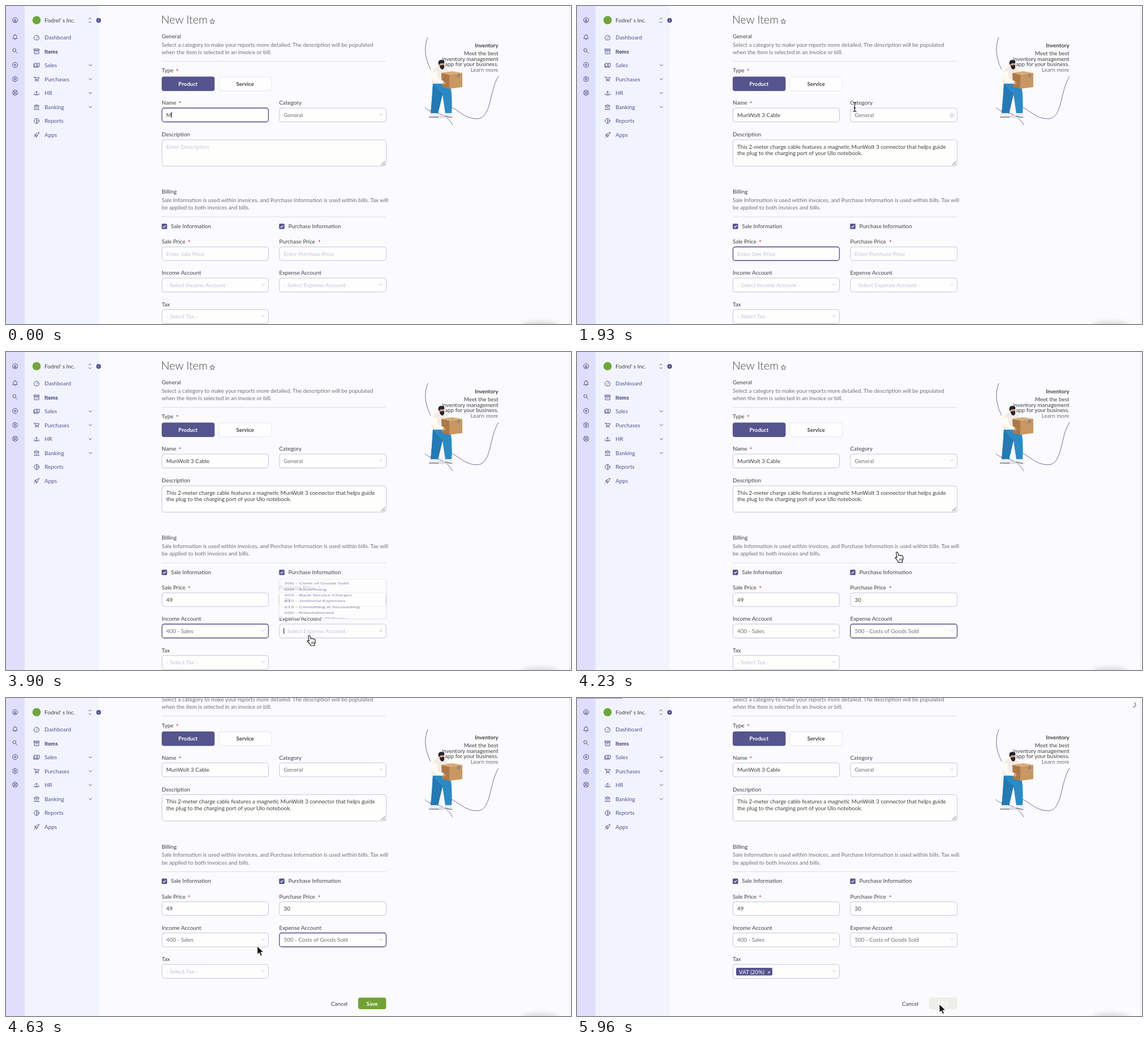
Animation, 998 px wide and 561 px high, one loop 6 s. Source, as an HTML page:

```html
<!DOCTYPE html>
<html lang="en">
<head>
<meta charset="utf-8">
<title>New item form</title>
<style>
html, body { margin: 0; width: 100%; height: 100%; overflow: hidden; background: #fbfafd; }
svg { display: block; width: 998px; height: 561px; font: 9.9px Lato, "Open Sans", sans-serif; fill: #424242; }
.line { fill: none; stroke: #55588b; stroke-width: 1; stroke-linecap: round; stroke-linejoin: round; }
.b { font-weight: 700; font-size: 9.6px; }
.soft { fill: #71707a; }
.para { font-size: 9.8px; }
.menu { fill: #55558f; }
.hint { fill: #c4c3df; }
.white { fill: #fff; }
.mid { text-anchor: middle; }
.end { text-anchor: end; }
.box { fill: #fefefd; stroke: #c6c5e0; }
.panel { filter: drop-shadow(0 1px 2px #0002); }
</style>
</head>
<body>
<svg id="stage" viewBox="0 0 998 561" xmlns="http://www.w3.org/2000/svg"></svg>
<script>
const PURPLE = '#55548d', SCROLL = 65.5, LOOP = 6000;
const stage = document.getElementById('stage');

// Markup helpers: text is placed by the middle of its capitals.
const text = (x, y, s, cls = '') => `<text x="${x}" y="${y + 3.5}" class="${cls}">${s}</text>`;
const rect = (x, y, w, h, attrs) => `<rect x="${x}" y="${y}" width="${w}" height="${h}" ${attrs}/>`;
const path = (d, attrs = 'class="line"') => `<path d="${d}" ${attrs}/>`;
const icon = (x, y, d) => `<path class="line" transform="translate(${x} ${y})" d="${d}"/>`;
const ring = r => `M${-r} 0A${r} ${r} 0 1 1 ${r} 0A${r} ${r} 0 1 1 ${-r} 0`;
const circle = (x, y, r, fill) => `<circle cx="${x}" cy="${y}" r="${r}" fill="${fill}"/>`;

function rail() {
  const icons = [
    [25, ring(4.5) + ring(1.5) + 'M-3 3Q0 1 3 3'],
    [55, 'M-4 2.5H4L3 1V-1A3 3 0 0 0-3-1V1ZM-1 4H1M0-4V-5'],
    [79, 'M-4-1A2.8 2.8 0 1 1 1.6-1A2.8 2.8 0 1 1-4-1M1 1.5L4 4.5'],
    [104, ring(4.5) + 'M-2.2 0H2.2M0-2.2V2.2'],
    [129, 'M-1-4.5H1L1.5-3L3.5-3.2L4.5-1.5L3.4 0L4.5 1.5L3.5 3.2L1.5 3L1 4.5H-1L-1.5 3L-3.5 3.2L-4.5 1.5L-3.4 0L-4.5-1.5L-3.5-3.2L-1.5-3Z' + ring(1.5)],
    [153, ring(4.5) + ring(1.8) + 'M-3.2-3.2L-1.3-1.3M3.2-3.2L1.3-1.3M-3.2 3.2L-1.3 1.3M3.2 3.2L1.3 1.3'],
  ];
  return rect(0, 0, 33, 561, 'fill="#dfdffd"') + icons.map(([y, d]) => icon(16, y, d)).join('');
}

function sidebar() {
  const items = [
    ['Dashboard', 'M-3.2 4A4.6 4.6 0 1 1 3.2 4ZM0 1.5L2-1.5'],
    ['Items', 'M-4.5-4.2H4.5V-2H-4.5ZM-4-1V4.2H4V-1ZM-1.3 1H1.3'],
    ['Sales', 'M-3.5-3.5H5V2H-3.5ZM-5-2V3.5H3.5M-.5-.8A1.2 1.2 0 1 1 2-.8A1.2 1.2 0 1 1-.5-.8', 1],
    ['Purchases', 'M-5-4H-3.5L-1.5 .5H3L4.7-3H-3M-1.5 .5L-2.5 2.3H3.5M-2 4.3H-1.8M3 4.3H3.2', 1],
    ['HR', 'M-1.3-2A1.3 1.3 0 1 1 1.3-2A1.3 1.3 0 1 1-1.3-2M-2.5 3Q0-.5 2.5 3ZM-4-.6H-3.8M3.8-.6H4M-5 3Q-4.5 1-3.2 1.4M5 3Q4.5 1 3.2 1.4', 1],
    ['Banking', 'M-4.5-1.8L0-4.5L4.5-1.8ZM-3 0V2.5M0 0V2.5M3 0V2.5M-4.5 4.3H4.5', 1],
    ['Reports', ring(4.4) + 'M0-4.4V4.4M0 0H4.4'],
    ['Apps', 'M-2 1Q0-4 4.5-4.5Q4 0-1 2ZM-2 1L-4 .5L-2.2-1.5H-.6M-1 2L-.5 4L1.5 2.2V.7M-4.5 4.5L-3 3'],
  ];
  return rect(33, 0, 131, 561, 'fill="#f1f4fe"') + circle(54, 25, 7.3, '#6ea63c') +
    text(68, 25, "Fodrel' s Inc.") + path('M146 23L148.2 20.8L150.4 23M146 27.5L148.2 29.7L150.4 27.5') +
    circle(163.6, 25.4, 4.1, '#4f4c88') + path('M164.4 23.8L162.8 25.4L164.4 27', 'fill="none" stroke="#fff"') +
    items.map(([name, d, more], i) => {
      const y = 55.5 + i * 24.55, on = i === 1;
      return icon(54, y, d) + text(68, y, name, on ? 'menu b" style="fill:#38356d' : 'menu') +
        (more ? icon(149, y, 'M-2.5-1.3L0 1.3L2.5-1.3') : '');
    }).join('');
}

function promo() {
  const curve = 'fill="none" stroke="#615f94" stroke-width=".9"';
  return path('M745 55C738 74 740 91 750 112', curve) + path('M740 179C753 193 773 182 789 210', curve) +
    path('M870 124C853 150 858 199 832 199C808 199 798 180 779 176', curve) +
    '<ellipse cx="770" cy="195" rx="21" ry="2.5" fill="#dddbe5"/>' +
    path('M754 135L785 137Q789 164 787 190H776L771 156L763 190H750Q753 158 754 135Z', 'fill="#2b8ac4"') +
    path('M754 137L771 156L763 190H750Q753 158 754 137Z', 'fill="#2479b3"') +
    path('M749 189H762L764 196H747ZM776 189H787L790 194L788 197L775 194Z', 'fill="#eeedf0"') +
    path('M747 196H764M775 194L788 197', 'stroke="#45475c" fill="none"') +
    path('M761 107Q773 104 780 111L785 137H753Q747 117 761 107Z', 'fill="#f4ece4"') +
    circle(769.5, 103, 4.8, '#d99a7b') +
    path('M764 104Q762 95 769 95Q776 95 774 101H768ZM766 105L774 104Q775 112 770 112Q766 110 766 105Z', 'fill="#242331"') +
    path('M769 118L783 121V146L770 143Z', 'fill="#ab7848"') + path('M783 121L806 118V143L783 146Z', 'fill="#c99762"') +
    path('M769 118L788 115L806 118L783 121Z', 'fill="#daab78"') +
    path('M797 120L802 119.3V125L797 126Z', 'fill="#8c8a82"') +
    path('M751 117Q749 130 760 134L773 138L774 133L763 128L761 115Z', 'fill="#fffaf3"') + circle(774, 136, 2.5, '#d99a7b') +
    text(869.5, 69.5, 'Inventory', 'end b') + text(869.5, 83.7, 'Meet the best', 'end') +
    text(869.5, 93, 'inventory management', 'end') + text(869.5, 102.3, 'app for your business.', 'end') +
    text(869.5, 112.5, 'Learn more', 'end soft');
}

const label = (x, y, s, starX) => text(x, y, s) +
  (starX ? text(starX, y + 1, '*', 'mid b" style="fill:#c8202c') : '');

const fields = {
  name: [275, 180, 188.5, 24.5, 'Name', '', 0, 307],
  category: [482.5, 180, 189, 24.5, 'Category', '', 1],
  description: [275, 236, 396.5, 46.5, 'Description', 'Enter Description'],
  sale: [275, 425, 188.5, 24, 'Sale Price', 'Enter Sale Price', 0, 323.5],
  purchase: [482.5, 425, 189, 24, 'Purchase Price', 'Enter Purchase Price', 0, 553.5],
  income: [275, 480, 188.5, 24.5, 'Income Account', '- Select Income Account -', 1],
  expense: [482.5, 480, 189, 24.5, 'Expense Account', '- Select Expense Account -', 1],
  tax: [275, 535.5, 188.5, 24.5, 'Tax', '- Select Tax -', 1],
};

function fieldMarkup([id, [x, y, w, h, name, , select, starX]]) {
  return label(x, y - 9.3, name, starX) + `<g id="${id}">` + rect(x + .5, y, w - .5, h, 'rx="4" class="box"') +
    text(x + 8, y + 12.3, '') + path('M0 0V10', 'class="caret" stroke="#333" stroke-width="1.2"') +
    (select ? path('M-2.8-1.4L0 1.4L2.8-1.4', 'class="chev" fill="none" stroke="#bdbcd2"') : '') + '</g>';
}

function panel(id, x, y, h, items) {
  return `<g id="${id}" class="panel"><clipPath id="${id}Clip">${rect(x, y, 188.5, h, '')}</clipPath>` +
    rect(x + .5, y, 188, h, 'rx="2" fill="#fefefe" stroke="#e6e5ee" stroke-width=".7"') +
    `<g clip-path="url(#${id}Clip)">` + items.map((s, i) => text(x + 9, y + 13.3 + 18 * i, s, 'menu')).join('') + '</g></g>';
}

const checkbox = (x, s) => rect(x, 384, 9.5, 9.5, `rx="1.5" fill="${PURPLE}"`) +
  path(`M${x + 2.3} 388.8L${x + 4.1} 390.6L${x + 7.2} 386.9`, 'fill="none" stroke="#fff" stroke-width="1.2"') + text(x + 16.3, 388, s);

function form() {
  const starPoints = Array.from({ length: 10 }, (_, i) => {
    const a = i * Math.PI / 5, r = i % 2 ? 2.2 : 4.6;
    return `${364.5 + r * Math.sin(a)},${27.5 - r * Math.cos(a)}`;
  }).join(' ');
  const rule = y => path(`M275 ${y}H671.5`, 'stroke="#dedde6"');
  return '<g id="form"><text x="274" y="31" style="font-size:19.6px;font-weight:300">New Item</text>' +
    `<polygon points="${starPoints}" class="line"/>` +
    text(275, 53.3, 'General') +
    text(275, 68, 'Select a category to make your reports more detailed. The description will be populated', 'soft para') +
    text(275, 81.3, 'when the item is selected in an invoice or bill.', 'soft para') + rule(97.5) +
    label(275, 113.6, 'Type', 302.5) +
    rect(275, 124.5, 93.5, 25.5, `rx="4" fill="${PURPLE}"`) + text(321.5, 137.3, 'Product', 'mid b white') +
    rect(376, 125, 93, 24.5, 'rx="4" fill="#fefefe" stroke="#e6e5ee"') + text(422.4, 137.3, 'Service', 'mid b') +
    text(275, 327.6, 'Billing') +
    text(275, 342.4, 'Sale Information is used within invoices, and Purchase Information is used within bills. Tax will', 'soft para') +
    text(275, 355.8, 'be applied to both invoices and bills.', 'soft para') + rule(372) +
    checkbox(275, 'Sale Information') + checkbox(482.4, 'Purchase Information') +
    Object.entries(fields).map(fieldMarkup).join('') +
    '<g id="clear"><circle cx="662" cy="193" r="3.6" fill="none" stroke="#c0bfd2"/>' +
    path('M660.7 191.7L663.3 194.3M663.3 191.7L660.7 194.3', 'stroke="#c0bfd2"') + '</g>' +
    '<g id="copy">' + text(283, 248, 'This 2-meter charge cable features a magnetic MunWolt 3 connector that helps guide') +
    text(283, 259.6, 'the plug to the charging port of your Ulo notebook.') + '</g>' +
    path('M662.5 281L669.5 274M666.5 281L669.5 278', 'stroke="#555" fill="none"') +
    '<g id="tag">' + rect(281, 541.5, 64, 13.5, `rx="2" fill="${PURPLE}"`) + text(286, 548.6, 'VAT (20%)', 'white') +
    path('M337 547.5L341 551.5M341 547.5L337 551.5', 'stroke="#fff" stroke-width=".9"') + '</g>' +
    text(588.6, 604.5, 'Cancel', 'mid') +
    '<g id="save">' + rect(622, 594, 49.5, 20.5, 'id="saveBox" rx="4"') + text(646.7, 604.5, 'Save', 'mid b white') + '</g>' +
    '<g id="dots">' + [639, 646.5, 654].map(x => circle(x, 603, 1.8, '#fff')).join('') + '</g>' +
    panel('incomeList', 275, 389.5, 80.5, ['400 - Sales', '460 - Interest Income', '470 - Other Revenue', '475 - Purchase Discount']) +
    panel('expenseList', 482.5, 349, 121, ['500 - Costs of Goods Sold', '600 - Advertising', '605 - Bank Service Charges',
      '610 - Janitorial Expenses', '615 - Consulting &amp; Accounting', '620 - Entertainment', '624 - Postage &amp; Delivery']) +
    '<g id="taxList" class="panel">' + rect(275.5, 567.5, 188, 47, 'rx="2" fill="#fefefe" stroke="#e6e5ee" stroke-width=".7"') +
    rect(276, 572, 187, 20, 'fill="#f6f6fc"') + text(284, 581.7, 'VAT (20%)', 'menu b" style="fill:#45427d') +
    path('M452 581.7L454.3 584L459 579.3', 'fill="none" stroke="#6ea63c" stroke-width="1.2"') +
    path('M276 595.5H463', 'stroke="#c9c8d8"') + path('M282 604.7H288M285 601.7V607.7') +
    text(290.5, 604.7, 'New Tax', 'menu b') + '</g></g>';
}

const beam = 'M-3-8Q0-8 0-6Q0-8 3-8M0-6V6M-3 8Q0 8 0 6Q0 8 3 8M-1.5 2H1.5';
const pointers = '<g id="cursor"><g id="beam">' +
  path(beam, 'fill="none" stroke="#fff" stroke-width="2.8"') +
  path(beam, 'fill="none" stroke="#222" stroke-width="1.3"') + '</g><g id="hand">' +
  path('M-1.5 1Q0-1.5 1.5 1L3 6Q4.5 4.5 5.5 6Q7 5 8 6.5Q10 6 10.5 8L11 12L9.5 15V18H2V16L-3 10.5Q-3.5 8.5-1.5 9L0 10Z', 'fill="#fff" stroke="#222" stroke-width="1.2" stroke-linejoin="round"') +
  path('M4.5 11V15M6.5 11V15M8.5 11V15', 'stroke="#222" stroke-width=".8"') + '</g><g id="arrow">' +
  path('M0 0V15L3.5 11.8L6 17.5L8.6 16.4L6.2 10.8H11Z', 'fill="#111" stroke="#fff"') + '</g></g>';

stage.innerHTML = '<filter id="blur" x="-50%" y="-200%" width="200%" height="500%"><feGaussianBlur stdDeviation="4"/></filter>' +
  rect(0, 0, 998, 561, 'fill="#fbfafd"') + form() + rail() + sidebar() + promo() +
  path('M995.5 0V561', 'stroke="#e4e3ea"') + rect(996, 0, 2, 561, 'fill="#fdfdfe"') +
  '<ellipse cx="943" cy="562" rx="32" ry="5" fill="#000" opacity=".15" filter="url(#blur)"/>' +
  rect(0, 0, 0, 1, 'id="bar" fill="#8583b8"') +
  path('M0-3.9A3.9 3.9 0 0 1 0 3.9', 'id="spinner" fill="none" stroke="#6563a0" stroke-width="1.3"') + pointers;

const $ = id => document.getElementById(id);
const show = (id, on) => $(id).style.display = on ? '' : 'none';
const ramp = (t, from, span) => Math.min(1, Math.max(0, (t - from) / span));
const easeOut = u => 1 - (1 - u) ** 2;
const within = (t, a, b) => t >= a && t < b;
const opening = (t, a, b, span = 84) => ramp(t, a, span) * (1 - ramp(t, b, span));

function setField(id, { value = '', focus, caret, open = 0, hint = true, chev = true }) {
  const g = $(id), [x, y, w, , , placeholder] = fields[id];
  const box = g.querySelector('rect'), content = g.querySelector('text');
  box.style.stroke = focus ? '#4d4a8a' : '';
  box.style.strokeWidth = focus ? 1.3 : 1;
  content.textContent = value || (hint ? placeholder : '');
  content.setAttribute('class', !value ? 'hint' : g.querySelector('.chev') ? 'soft' : '');
  const line = g.querySelector('.caret'), arrow = g.querySelector('.chev');
  line.style.display = caret ? '' : 'none';
  const cx = id === 'tax' && !hint ? x + 76.8 : x + 8.3 + (value && content.getComputedTextLength());
  if (caret) line.setAttribute('transform', `translate(${cx} ${y + 7})`);
  if (arrow) {
    arrow.setAttribute('transform', `translate(${x + w - 9.3} ${y + 11.3}) rotate(${-180 * open})`);
    arrow.style.display = chev ? '' : 'none';
  }
}

function setPanel(id, p, originY) {
  show(id, p > 0);
  $(id).setAttribute('transform', `translate(0 ${originY * (1 - p)}) scale(1 ${p})`);
  $(id).style.opacity = p ** .6;
}

// time, x, y, pointer kind ('' hides it)
const track = [
  [0, 512, 84, ''], [1570, 512, 84, 'beam'], [1860, 510, 86, 'beam'], [1930, 490.5, 178, 'beam'], [2220, 378, 432, 'beam'],
  [2400, 378, 432, ''], [3400, 332, 404, 'hand'], [3620, 332, 404, 'hand'], [3820, 535.5, 500, 'hand'], [3950, 535.5, 500, 'hand'],
  [4080, 546, 362, 'hand'], [4180, 546, 362, 'hand'], [4240, 566.5, 352.5, 'arrow'], [4540, 566.5, 352.5, 'arrow'],
  [4690, 380, 482, 'hand'], [4780, 380, 482, 'hand'], [4900, 344, 507, 'hand'], [5140, 344, 507, 'hand'],
  [5460, 640, 540, 'hand'], [5690, 640, 540, 'arrow'], [LOOP, 640, 540, 'arrow'],
];

function setCursor(t) {
  const i = track.findLastIndex(k => k[0] <= t), [t0, x0, y0, kind] = track[i], [t1, x1, y1] = track[i + 1] || track[i];
  const u = ramp(t, t0, t1 - t0 || 1), e = u * u * (3 - 2 * u);
  $('cursor').setAttribute('transform', `translate(${x0 + (x1 - x0) * e} ${y0 + (y1 - y0) * e})`);
  for (const k of ['beam', 'hand', 'arrow']) show(k, k === kind);
}

function typedName(t) {
  const first = t < 30 ? 0 : Math.min(9, Math.floor((t - 30) / 75) + 1);
  const rest = t < 730 ? 0 : Math.min(5, Math.floor((t - 730) / 65) + 1);
  return 'MunWolt 3 Cable'.slice(0, 1 + first + rest);
}

function render(t) {
  $('form').setAttribute('transform', `translate(0 ${-SCROLL * easeOut(ramp(t, 4400, 136))})`);

  const income = opening(t, 3215, 3560), expense = opening(t, 3853, 4130), tax = opening(t, 4730, 5665);
  const hover = within(t, 1900, 1990), picked = t >= 5000;
  setField('name', { value: typedName(t), focus: t < 1120, caret: t < 1120 });
  setField('category', { value: 'General', chev: !hover });
  show('clear', hover);
  setField('description', { focus: within(t, 1120, 1860), caret: within(t, 1150, 1360), hint: t < 1360 });
  show('copy', t >= 1360);
  setField('sale', { value: t < 2430 ? '' : t < 2530 ? '4' : '49', focus: within(t, 1860, 2740), caret: within(t, 2400, 2740) });
  setField('purchase', { value: t < 3000 ? '' : t < 3060 ? '3' : '30', focus: within(t, 2740, 3230), caret: within(t, 2790, 3230) });
  setField('income', { value: t < 3560 ? '' : '400 - Sales', focus: within(t, 3230, 3915), caret: within(t, 3230, 3560), open: opening(t, 3230, 3560, 110) });
  setField('expense', { value: t < 4130 ? '' : '500 - Costs of Goods Sold', focus: within(t, 3915, 4700), caret: within(t, 3860, 4130), open: opening(t, 3875, 4130, 100) });
  setField('tax', { focus: within(t, 4730, 5670), caret: within(t, 4730, 5670), open: tax, hint: !picked });
  setPanel('incomeList', income, 470);
  setPanel('expenseList', expense, 470);
  setPanel('taxList', tax, 567.5);
  show('tag', picked);
  $('tag').style.opacity = ramp(t, 4980, 100);

  $('saveBox').style.fill = within(t, 5440, 5670) ? '#5d8a2b' : '#72a236';
  $('save').style.opacity = 1 - .9 * ramp(t, 5670, 140);
  show('dots', t > 5720);
  [...$('dots').children].forEach((dot, i) => dot.setAttribute('cy', 603 + 1.5 * Math.sin(t / 60 - i)));

  $('bar').setAttribute('width', 80 * easeOut(ramp(t, 5760, 140)));
  show('spinner', t >= 5760);
  $('spinner').setAttribute('transform', `translate(983 12) rotate(${20 + (t - 5960) * .9})`);
  setCursor(t);
}

function tick(now) {
  render(now % LOOP);
  requestAnimationFrame(tick);
}
render(0);
requestAnimationFrame(tick);
</script>
</body>
</html>
```
